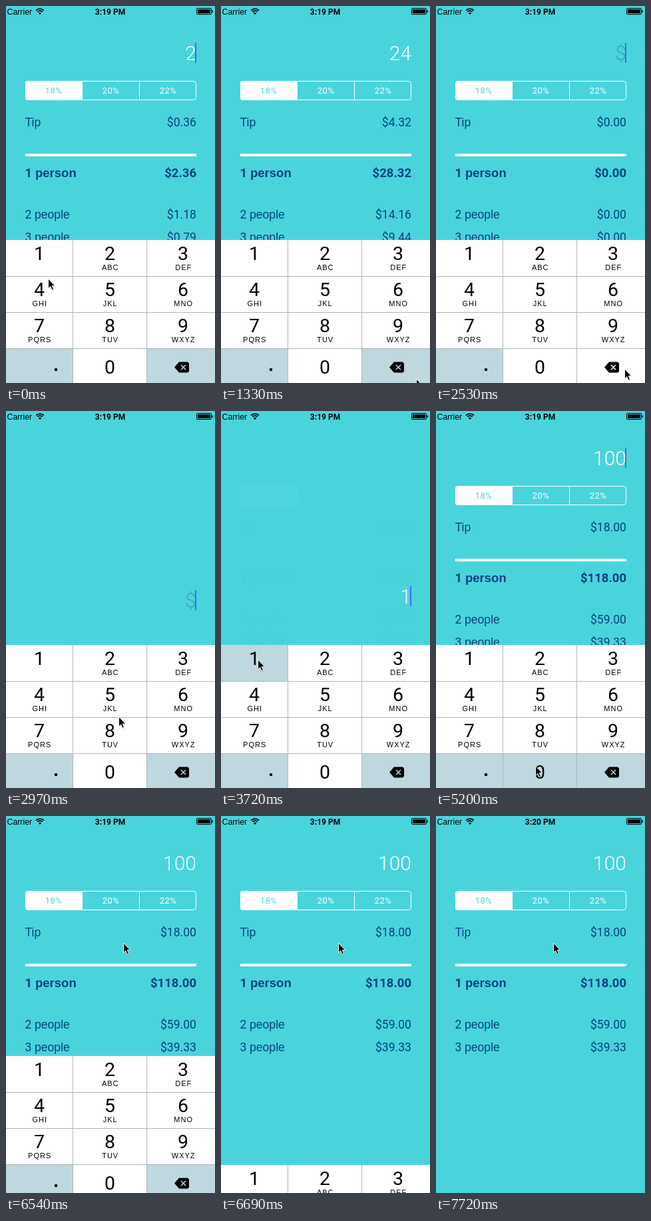
These frames come from a looping animation (314x564 px, 8 s). An HTML page with a canvas:

```html
<!DOCTYPE html>
<html lang="en">
<head>
<meta charset="utf-8">
<title>Tip calculator</title>
<style>
  html, body { margin: 0; width: 314px; height: 564px; overflow: hidden; background: #49d4dc; }
  canvas { display: block; }
</style>
</head>
<body>
<canvas id="stage" width="314" height="564"></canvas>
<script>
const ctx = document.getElementById('stage').getContext('2d');
const LOOP = 8000, TICK = 148.4; // the screen refreshes once per tick
const SANS = '"Liberation Sans", Arial, sans-serif';
const NUM = 'Roboto, "Liberation Sans", sans-serif';
const BG = '#49d4dc', NAVY = '#07417f', GREY = '#bfd8df', LINE = '#b2b6b8';

// [tick, bill text]
const TYPED = [[-3, '2'], [3, '24'], [14, '2'], [17, ''], [25, '1'], [31, '10'], [35, '100']];
// [tick, x, y]
const POINTER = [
  [4, 63, 408], [9, 293, 558], [11, 283, 543], [17, 283, 543],
  [23, 55, 372], [25, 55, 372], [30, 149, 531], [37, 149, 531], [40, 176, 190]
];
const KEYS = ['', 'ABC', 'DEF', 'GHI', 'JKL', 'MNO', 'PQRS', 'TUV', 'WXYZ'];
const COLS = [[0, 100, 50], [101, 110, 156], [212, 102, 266]]; // left, width, centre

const clamp = v => Math.max(0, Math.min(1, v));
const ease = v => { v = clamp(v); return v * v * (3 - 2 * v); };
const money = v => '$' + v.toFixed(2);

function text(s, x, y, font, color, align = 'left', spacing = 0) {
  ctx.font = font;
  ctx.fillStyle = color;
  ctx.textAlign = align;
  ctx.letterSpacing = spacing + 'px';
  ctx.fillText(s, x, y);
}

function rect(x, y, w, h, color) {
  ctx.fillStyle = color;
  ctx.fillRect(x, y, w, h);
}

function shape(points, color) {
  ctx.beginPath();
  points.forEach(([x, y]) => ctx.lineTo(x, y));
  ctx.closePath();
  ctx.fillStyle = color;
  ctx.fill();
}

function statusBar(k) {
  text('Carrier', 1.5, 13, '12.3px ' + SANS, '#000');
  text(k < 52 ? '3:19 PM' : '3:20 PM', 156.5, 13, 'bold 12px ' + NUM, '#000', 'center');
  ctx.strokeStyle = '#000';
  ctx.lineWidth = 1.7;
  for (const r of [8.4, 5.4]) {
    ctx.beginPath();
    ctx.arc(51, 12.5, r, -Math.PI * 0.75, -Math.PI * 0.25);
    ctx.stroke();
  }
  shape([[51, 13], [48.6, 10.4], [51, 9.4], [53.4, 10.4]], '#000');
  ctx.lineWidth = 1;
  ctx.beginPath();
  ctx.roundRect(286.5, 3.5, 22, 9, 1.5);
  ctx.stroke();
  rect(288, 5, 19, 6, '#000');
  rect(309.5, 6.5, 1.5, 3, '#000');
}

function segments() {
  ctx.strokeStyle = '#fff';
  ctx.lineWidth = 1;
  ctx.beginPath();
  ctx.roundRect(29.5, 112.5, 256, 28, 4);
  ctx.stroke();
  ctx.fillStyle = '#fff';
  ctx.beginPath();
  ctx.roundRect(29, 112, 86, 29, [4, 0, 0, 4]);
  ctx.fill();
  rect(200, 112, 1, 29, '#fff');
  ['18%', '20%', '22%'].forEach((s, i) =>
    text(s, 71.5 + 86 * i, 131, '13px ' + NUM, i ? '#fff' : BG, 'center', 0.5));
}

function results(bill) {
  const total = bill * 1.18;
  const regular = '17.6px ', bold = 'bold 18.5px ';
  segments();
  text('Tip', 28.5, 180, regular + SANS, NAVY);
  text(money(bill * 0.18), 286, 180, regular + NUM, NAVY, 'right');
  rect(29, 221, 257, 4, '#fff');
  [256, 318, 352].forEach((y, i) => {
    const size = i ? regular : bold;
    text(i + 1, 28.5, y, size + NUM, NAVY);
    text(i ? 'people' : 'person', i ? 43 : 44, y, size + SANS, NAVY);
    text(money(total / (i + 1)), 286, y, size + NUM, NAVY, 'right');
  });
}

function caretAlpha(age) {
  const phase = age % 6;
  if (age < 4) return 1;
  return phase === 4 ? 0.5 : phase === 5 || phase === 0 ? 0 : 1;
}

function amount(value, y, caret) {
  text(value || '$', 286, y + 81, '300 30px ' + NUM, value ? '#fff' : '#3ba6b0', 'right');
  ctx.globalAlpha = caret;
  rect(284, y + 55, 2, 30, '#426bf2');
  ctx.globalAlpha = 1;
}

function keyboard(k, top) {
  const digit = '28.5px ' + NUM;
  const erase = k === 17 ? '#fff' : GREY;
  ctx.save();
  ctx.translate(0, top);
  rect(0, 0, 314, 215, '#fff');
  if (k === 25) rect(0, 0, 100, 54, GREY);
  rect(0, 163, 100, 52, GREY);
  if (k === 35) rect(101, 163, 110, 52, GREY);
  rect(212, 163, 102, 52, erase);
  for (const y of [54, 108, 162]) rect(0, y, 314, 1, LINE);
  for (const x of [100, 211]) rect(x, 0, 1, 215, LINE);
  KEYS.forEach((letters, i) => {
    const x = COLS[i % 3][2], y = 54 * Math.floor(i / 3);
    text(i + 1, x, y + 30, digit, '#000', 'center');
    text(letters, x + 0.7, y + 45, '11px ' + SANS, '#000', 'center', 1);
  });
  text('0', 156, 200, digit, '#000', 'center');
  rect(73, 192, 4, 4, '#000');
  shape([[253, 190.5], [260, 182.5], [273, 182.5], [275, 184.5],
         [275, 196.5], [273, 198.5], [260, 198.5]], '#000');
  ctx.strokeStyle = erase;
  ctx.lineWidth = 1.5;
  ctx.beginPath();
  for (const d of [-3.5, 3.5]) {
    ctx.moveTo(266.5 - d, 187);
    ctx.lineTo(266.5 + d, 194);
  }
  ctx.stroke();
  ctx.restore();
}

function pointer(k) {
  let i = POINTER.findIndex(p => p[0] > k);
  if (i < 0) i = POINTER.length;
  const a = POINTER[Math.max(0, i - 1)], b = POINTER[Math.min(i, POINTER.length - 1)];
  const p = a === b ? 0 : ease((k - a[0]) / (b[0] - a[0]));
  ctx.save();
  ctx.translate(a[1] + (b[1] - a[1]) * p + 0.5, a[2] + (b[2] - a[2]) * p);
  ctx.shadowColor = 'rgba(0,0,0,.35)';
  ctx.shadowBlur = 2;
  ctx.shadowOffsetY = 1;
  shape([[0, 0], [0, 14.5], [3.3, 11.5], [5.5, 16.8], [8, 15.8], [5.8, 10.6], [10.2, 10.6]], '#000');
  ctx.shadowColor = 'transparent';
  ctx.strokeStyle = '#fff';
  ctx.lineWidth = 1;
  ctx.stroke();
  ctx.restore();
}

function draw(ms) {
  const k = Math.floor((ms + 8) / TICK);
  const [since, value] = TYPED.filter(e => e[0] <= k).pop();
  const shown = k < 25 ? 1 - ease((k - 17) / 3) : ease((k - 24.7) / 3);
  const w = Math.max(0, k - 43.882) * TICK / 1000 * 18.26;
  const slide = 1 - (1 + w) * Math.exp(-w); // critically damped spring

  rect(0, 0, 314, 564, BG);
  statusBar(k);
  ctx.globalAlpha = shown;
  results(Number(value));
  ctx.globalAlpha = 1;
  amount(value, Math.round(213 * (1 - shown)), k < 44 ? caretAlpha(k - since) : 0);
  if (k < 47) keyboard(k, 350 + Math.round(214 * slide));
  pointer(k);
}

function loop(now) {
  draw(now % LOOP);
  requestAnimationFrame(loop);
}
draw(0);
requestAnimationFrame(loop);
</script>
</body>
</html>
```
